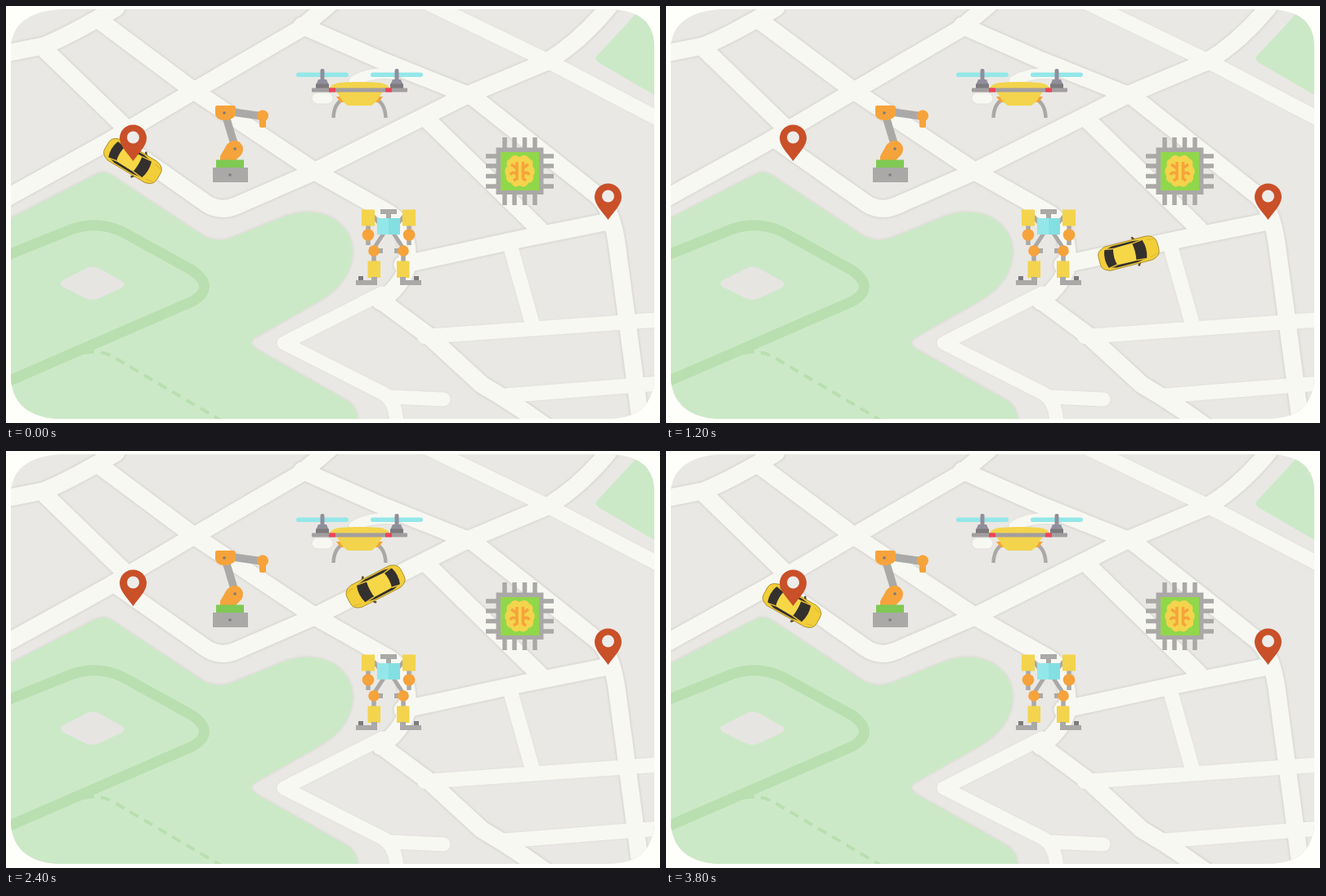
Animation, 800 px wide and 511 px high, one loop 3.9 s. Source, as an HTML page:

```html
<!DOCTYPE html>
<html lang="en">
<meta charset="utf-8">
<title>Car on a map</title>
<style>
  html, body { margin: 0; width: 100%; height: 100%; overflow: hidden; background: #fefefa; }
  svg { display: block; }
  .grey { fill: #aaa9a7; } .dark { fill: #7c7a7c; } .yellow { fill: #f3d44c; }
  .orange { fill: #f6a33b; } .cyan { fill: #94e7e8; }
  .limb { fill: none; stroke: #aaa9a7; }
</style>
<svg width="800" height="511" viewBox="0 0 800 511">
  <defs>
    <clipPath id="card"><path d="M66 4H740Q793 6 793 50V456Q791 506 736 506H62Q10 502 6 458V48Q10 8 66 4Z"/></clipPath>
    <filter id="soft"><feGaussianBlur stdDeviation="1.2"/></filter>
    <g id="roads" fill="none" stroke-linejoin="round" stroke-linecap="round">
      <path d="M-10 60L45 49Q75 38 135 2M45 51L145 148M112 16L230 104L380 204L470 255Q492 270 491 312"/>
      <path d="M-10 241L120 169L230 104L360 28L400 -6M362 24L460 67L572 112L722 231Q740 245 747 290L777 515"/>
      <path d="M133 163L245 242Q262 253 281 245L375 204L562 110L662 68Q705 42 742 -5"/>
      <path d="M507 -8L662 67L805 142" stroke-width="18"/>
      <path d="M485 317L632 285L737 264M492 310Q490 338 458 362"/>
      <path d="M514 138L652 273"/>
      <path d="M618 298L644 390M512 405L805 384M604 478L805 462" stroke-width="18"/>
      <path d="M460 352L340 413L462 475Q478 485 478 515M470 479L535 482" stroke-width="17"/>
      <path d="M460 362L518 405L582 464Q620 486 660 515"/>
      <path d="M381 113H393M426 92Q445 80 475 83" stroke-width="13"/>
    </g>
    <path id="park" d="M0 263L110 206Q120 201 130 208L240 281Q255 290 274 285L338 259C385 240 424 266 424 301Q423 338 384 361L305 406Q294 412 307 421L418 484Q430 492 431 512H0Z"/>
    <g id="pin">
      <path fill="#c95028" d="M0 0C-8-11-16.500-19-16.500-28A16.500 16.500 0 0 1 16.500-28C16.500-19 8-11 0 0Z"/>
      <circle cy="-29" r="7.500" fill="#eeecea"/>
    </g>
    <g id="half-drone">
      <rect x="355" y="81.500" width="64" height="5.500" rx="2.700" class="cyan"/>
      <rect x="384.500" y="77" width="5" height="16" rx="2" fill="#918e9c"/>
      <path d="M382 90H392L395 97H379Z" fill="#918e9c"/>
      <rect x="379" y="95.500" width="16" height="6" class="dark"/>
      <path d="M414 113Q401 119 400.500 137" class="limb" stroke-width="4.500"/>
      <path d="M404 111H417V118H409Z" class="orange"/>
    </g>
    <g id="half-robot">
      <path d="M457 267L448 256M463 277L450 297" class="limb" stroke-width="5"/>
      <path d="M443 268V293M450 298V337" class="limb" stroke-width="5.500"/>
      <rect x="435" y="249.500" width="16" height="20" class="yellow"/>
      <circle cx="443" cy="280.500" r="7.300" class="orange"/>
      <rect x="455" y="297" width="6" height="6" class="grey"/>
      <circle cx="450" cy="300" r="6.800" class="orange"/>
      <rect x="442.500" y="312.500" width="15.500" height="20.500" class="yellow"/>
      <path d="M428 336H447V332H454V342H428Z" class="grey"/>
      <rect x="431" y="331" width="6" height="5" class="dark"/>
    </g>
  </defs>

  <g clip-path="url(#card)">
    <rect width="800" height="511" fill="#e9e8e4"/>
    <use href="#park" fill="none" stroke="#dedcd8" stroke-width="3" filter="url(#soft)"/>
    <use href="#roads" stroke="#d9d7d3" stroke-width="24" filter="url(#soft)"/>
    <use href="#roads" stroke="#f8f8f3" stroke-width="21"/>
    <use href="#park" fill="#cce9c7"/>
    <path d="M800 8H772L722 62Q720 66 726 70L800 113Z" fill="#cce9c7"/>
    <path d="M0 306L82 273Q114 263 143 277L228 324Q257 345 228 362L0 461" fill="none" stroke="#b9dfb1" stroke-width="13"/>
    <path d="M68 337L99 321Q107 318 115 322L143 338Q147 342 140 346L114 358Q105 362 97 358L69 344Q65 340 68 337Z" fill="#e6e5e2"/>
    <path d="M96 425Q117 421 133 431L265 509" fill="none" stroke="#b9dfb1" stroke-width="4" stroke-dasharray="12 8"/>
  </g>

  <g id="car">
    <path d="M8-18L12-13M8 18L12 13" stroke="#5b4c24" stroke-width="2.500"/>
    <path d="M-27-15H26Q37-13 37-4V4Q37 13 26 15H-27Q-37 12-37 5V-5Q-37-12-27-15Z" fill="#f2cf39" stroke="#a58526" stroke-width=".8"/>
    <path d="M-28-11L-18-13.500H8L20-11.500Q24 0 20 11.500L8 13.500H-18L-28 11Q-32 0-28-11Z" fill="#34302d"/>
    <path d="M-17-10.500L7-11Q9 0 7 11L-17 10.500Q-20 0-17-10.500Z" fill="#f6d747"/>
    <path d="M-28-12L-17-10M-28 12L-17 10M20-12L7-10.500M20 12L7 10.500" stroke="#e2bd38" stroke-width="1.500"/>
    <path d="M25-11L34-9M25 11L34 9" stroke="#dbb733"/>
  </g>

  <g id="drone">
    <use href="#half-drone"/>
    <use href="#half-drone" transform="matrix(-1 0 0 1 865 0)"/>
    <path class="yellow" d="M395 102Q398 95 408 94Q432 92 457 94Q467 95 470 102L460 106L453 117L447 122H418L412 117L405 106Z"/>
    <rect x="374" y="100.500" width="117" height="5" rx="1" fill="#a39e9f"/>
    <path d="M395 103H403M464 103H472" stroke="#ef4358" stroke-width="5"/>
  </g>

  <g id="arm">
    <path d="M268 132L280 172M277 130L313 135" class="limb" stroke-width="9.500"/>
    <path class="orange" d="M258 122H278Q281 122 281 126V134Q276 140 267 140Q258 140 256 133V124Q256 122 258 122ZM262 189V184L270 170Q278 162 286 167Q293 174 288 182L281 189Z"/>
    <circle cx="314" cy="134.500" r="7" class="orange"/>
    <rect x="310" y="136" width="8" height="13" rx="2" class="orange"/>
    <rect x="257" y="188.500" width="34" height="10" fill="#7fc954"/>
    <rect x="253" y="198" width="43" height="18" class="grey"/>
    <g class="dark"><circle cx="267" cy="131" r="1.800"/><circle cx="280" cy="175" r="1.800"/><circle cx="274" cy="207" r="1.800"/></g>
  </g>

  <g id="chip">
    <path class="limb" stroke-width="5.500" d="M610 161V244M622 161V244M634.500 161V244M647 161V244M587 184H670M587 196H670M587 208.500H670M587 221H670"/>
    <rect x="599.500" y="173.500" width="58" height="57.500" class="grey"/>
    <rect x="605" y="179" width="47" height="47" fill="#91d74a"/>
    <path class="yellow" d="M628 185Q621 180 617 187Q611 189 613 196Q608 202 612 208Q611 216 618 217Q622 224 628 220Q635 224 639 217Q646 216 645 208Q649 202 644 196Q646 189 640 187Q636 180 628 185Z"/>
    <path d="M625 191V213M632.500 191V213M625 199L618 194M632 199L639 194M625 206Q619 202 617 207M632 206Q638 202 640 207M625 211L621 214M632 211L636 214" fill="none" stroke="#f6a33b" stroke-width="3.500"/>
  </g>

  <g id="robot">
    <use href="#half-robot"/>
    <use href="#half-robot" transform="matrix(-1 0 0 1 936 0)"/>
    <path d="M458 249H478V255H471V262H465V255H458Z" class="grey"/>
    <rect x="454" y="260" width="28" height="20" class="cyan"/>
    <rect x="468" y="260" width="14" height="20" fill="#83dfe2"/>
  </g>

  <use href="#pin" x="155.500" y="190"/>
  <use href="#pin" x="736.500" y="262"/>
</svg>
<script>
  const LOOP = 3900, STEP = 100;
  const car = document.getElementById('car');

  // Each leg: start time, end time, route
  const legs = [
    [130, 600, 'M155 190L238 240Q262 254 285 243L341 218'],
    [600, 1200, 'M341 218Q375 200 400 215L465 252Q482 262 488 285Q497 318 530 310L566 303'],
    [1200, 1600, 'M566 303L716 264'],
    [1600, 2100, 'M716 264Q745 256 728 238L612 131Q597 117 575 116'],
    [2100, 2800, 'M575 116Q555 113 540 121L405 190Q382 204 360 191L292 148'],
    [2800, 3300, 'M292 148L245 116Q230 105 213 115L150 150Q112 166 155 190']
  ].map(([start, end, d]) => {
    const path = document.createElementNS('http://www.w3.org/2000/svg', 'path');
    path.setAttribute('d', d);
    return { start, end, path, length: path.getTotalLength() };
  });

  function placeCar(time) {
    const { start, end, path, length } = legs.find(leg => time < leg.end) || legs[legs.length - 1];
    const progress = Math.min(1, Math.max(0, (time - start) / (end - start)));
    const at = progress * (length - 1);
    const a = path.getPointAtLength(at), b = path.getPointAtLength(at + 1);
    const angle = Math.atan2(b.y - a.y, b.x - a.x) * 180 / Math.PI;
    car.setAttribute('transform', `translate(${a.x} ${a.y}) rotate(${angle})`);
  }

  function draw() {
    placeCar(Math.floor(performance.now() % LOOP / STEP) * STEP);
    requestAnimationFrame(draw);
  }
  draw();
</script>
</html>
```
